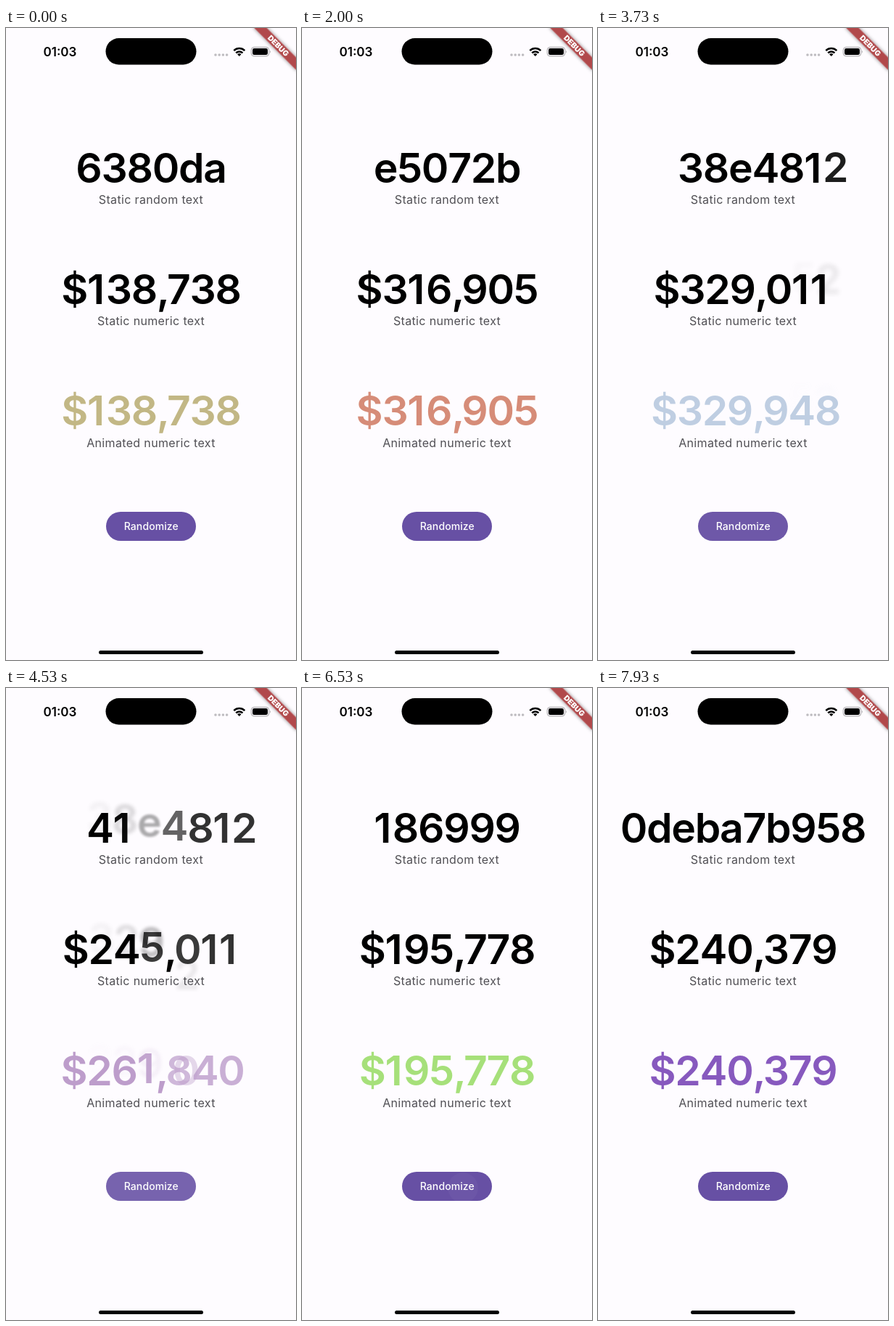
These frames come from a looping animation (400x870 px, 8 s). An HTML page:

```html
<!DOCTYPE html>
<html lang="en">
<head>
<meta charset="utf-8">
<title>Numeric text</title>
<style>
  html, body { margin: 0; width: 100%; height: 100%; overflow: hidden; background: #fefcff; }
  svg { display: block; width: 100%; height: 100%; font-family: Inter, Roboto, sans-serif; }
  .big { font-size: 57px; font-weight: 580; font-optical-sizing: none; }
  .label { font-size: 16px; letter-spacing: .35px; fill: #504f54; text-anchor: middle; }
</style>
</head>
<body>
<svg viewBox="0 0 400 870" xmlns="http://www.w3.org/2000/svg">
  <defs>
    <filter id="shade" x="-20%" y="-100%" width="140%" height="300%">
      <feDropShadow dx="0" dy="0" stdDeviation="2.5" flood-color="#000" flood-opacity=".5"/>
    </filter>
    <clipPath id="pill"><rect x="138" y="666" width="124" height="40" rx="20"/></clipPath>
  </defs>
  <rect width="400" height="870" fill="#fefcff"/>

  <text x="51.5" y="38.5" font-size="17" font-weight="600">01:03</text>
  <rect x="137.5" y="14" width="125" height="36.5" rx="18.2"/>
  <g fill="#bebcc0">
    <circle cx="289" cy="37" r="1.8"/><circle cx="294.2" cy="37" r="1.8"/>
    <circle cx="299.4" cy="37" r="1.8"/><circle cx="304.6" cy="37" r="1.8"/>
  </g>
  <g fill="none" stroke="#000" stroke-width="2.5">
    <path d="M314.3 31.2a10.6 10.6 0 0 1 15 0"/>
    <path d="M317.2 34.4a6.6 6.6 0 0 1 9.2 0"/>
  </g>
  <path d="M321.8 39l-2.7-2.8a4 4 0 0 1 5.4 0z"/>
  <rect x="338.3" y="26.4" width="24.4" height="12.4" rx="3.8" fill="none" stroke="#a09ea2"/>
  <rect x="340" y="28.1" width="21" height="9" rx="2.4"/>
  <path d="M364 30.6q1.5 2 0 4z" fill="#a09ea2"/>

  <g transform="translate(400 0) rotate(45)">
    <rect x="-42" y="28.5" width="84" height="12.2" fill="#b1494c" filter="url(#shade)"/>
    <text y="38.3" font-size="10.4" font-weight="900" fill="#fff" text-anchor="middle">DEBUG</text>
  </g>

  <g class="big" id="rows"></g>
  <text class="label" x="200" y="242">Static random text</text>
  <text class="label" x="200" y="409">Static numeric text</text>
  <text class="label" x="200" y="576.5">Animated numeric text</text>

  <g clip-path="url(#pill)">
    <rect x="138" y="666" width="124" height="40" fill="#6750a4"/>
    <circle id="ripple" cx="222" cy="688" fill="#fff"/>
  </g>
  <text x="200.3" y="691" font-size="14" font-weight="500" letter-spacing=".1" fill="#fff" text-anchor="middle">Randomize</text>
  <rect x="128" y="857" width="144" height="5" rx="2.5"/>
</svg>
<script>
const LOOP = 8000, STEP = 200 / 3, SLIDE = 585;

// press: finger down, start: the texts begin to change
const states = [
  { press: -2000, start: -2000, word: '6380da', value: 138738, color: [194, 183, 133] },
  { press: 330, start: 410, word: '73', value: 84443, color: [69, 192, 143] },
  { press: 1270, start: 1340, word: 'e5072b', value: 316905, color: [214, 140, 120] },
  { press: 2200, start: 2300, word: '28', value: 432252, color: [156, 219, 232] },
  { press: 3270, start: 3340, word: '38e4812', value: 329011, color: [208, 200, 223] },
  { press: 4200, start: 4342.495, word: '41', value: 245201, color: [151, 67, 162] },
  { press: 5400, start: 5449.4348, word: '186999', value: 195778, color: [166, 224, 122] },
  { press: 6530, start: 6830, word: '0deba7b958', value: 240379, color: [135, 89, 190] }
];

const rows = document.getElementById('rows');
const ripple = document.getElementById('ripple');
const clamp = x => Math.min(1, Math.max(0, x));
const mix = (a, b, k) => a + (b - a) * k;
const backOut = x => 1 + 2.7 * (x - 1) ** 3 + 1.7 * (x - 1) ** 2;
const money = v => '$' + Math.round(v).toLocaleString('en-US');

// Tight tracking, tighter at commas, looser at the narrow one
const tracking = ch => ch === ',' ? -4 : ch === '1' ? 1.5 : -1.3;
const widths = {};
function advance(ch) {
  if (!(ch in widths)) {
    rows.innerHTML = `<text>${ch}</text>`;
    widths[ch] = rows.firstChild.getComputedTextLength() + tracking(ch);
  }
  return widths[ch];
}
const widthOf = text => [...text].reduce((sum, ch) => sum + advance(ch), 0);

function glyph(ch, x, y, alpha = 1, blur = 0) {
  if (alpha < .01) return '';
  const style = blur > .2 ? ` style="filter:blur(${blur.toFixed(2)}px)"` : '';
  return `<text x="${x.toFixed(2)}" y="${y.toFixed(2)}" opacity="${alpha.toFixed(3)}"${style}>${ch}</text>`;
}

function leaving(ch, x, y, t, strength) {
  const gone = 1 - (1 - clamp(t / 250)) ** 2;
  return glyph(ch, x, y - 18 * gone, strength * (1 - gone) ** 1.5, 4 * gone);
}

function entering(ch, x, y, t) {
  const q = clamp(t / 115);
  return glyph(ch, x, y + 40 * (1 - backOut(q)), q ** .7, 3 * clamp(1 - q * 3));
}

// Characters change from left to right: old ones rise and blur, new ones spring up
function staticRow(y, from, to, age, lag = 0) {
  const width = mix(widthOf(from), widthOf(to), clamp(age / SLIDE));
  const count = Math.max(from.length, to.length);
  const waiting = 1 - .2 * clamp(age / 100);
  let oldX = 200 - width / 2, newX = oldX, ghosts = '', fresh = '';
  for (let i = 0; i < count; i++) {
    const a = from[i], b = to[i], t = age - lag - 300 * i / count;
    if (t < 0) {
      if (a) ghosts += glyph(a, oldX, y, waiting);
    } else if (a === b) {
      fresh += glyph(b, newX, y);
    } else {
      if (a) ghosts += leaving(a, oldX, y, t, .8);
      if (b) fresh += entering(b, newX, y, t);
    }
    if (a) oldX += advance(a);
    if (b) newX += advance(b);
  }
  return `<g>${ghosts}${fresh}</g>`;
}

// The running value is always visible; its digits hop in the same left to right wave
function countingRow(y, from, to, now, age, fill) {
  const slot = mix(widthOf(from), widthOf(to), clamp(age / SLIDE));
  const waiting = 1 - .2 * clamp(age / 100);
  let oldX = 200 - (slot + widthOf(now)) / 4, newX = oldX, ghosts = '', fresh = '';
  for (let i = 0; i < now.length; i++) {
    const a = from[i], b = now[i], t = age - 300 * i / now.length;
    const q = clamp(t / 115);
    if (a === b) {
      fresh += glyph(b, newX, y);
    } else {
      if (a && t >= 0) ghosts += leaving(a, oldX, y, t, .4);
      const alpha = t < 0 ? waiting : mix(.7, 1, q);
      fresh += glyph(b, newX, y + Math.min(0, 40 * (1 - backOut(q))), alpha);
    }
    if (a) oldX += advance(a);
    newX += advance(b);
  }
  return `<g fill="${fill}">${ghosts}${fresh}</g>`;
}

function textsAt(t) {
  const n = states.findLastIndex(s => t >= s.start);
  const to = states[n], from = states[Math.max(0, n - 1)];
  const age = t - to.start;
  const value = mix(to.value, from.value, (1 - clamp(age / 560)) ** 3.88);
  const rgb = to.color.map((c, i) => Math.round(mix(from.color[i], c, clamp(age / SLIDE))));
  const a = money(from.value), b = money(to.value);
  return staticRow(213, from.word, to.word, age, 40) +
    staticRow(380, a, b, age) +
    countingRow(547, a, b, money(value), age, `rgb(${rgb})`);
}

function drawRipple(t) {
  const s = states.findLast(s => t >= s.press);
  const held = t - s.press;
  const fade = 1 - clamp((t - s.start - 150) / 400);
  ripple.setAttribute('r', 18 + 90 * clamp(held / 225));
  ripple.setAttribute('opacity', .12 * clamp(.2 + held / 150) * fade);
}

let shown = -1;
function draw() {
  const step = Math.floor((performance.now() % LOOP + 5) / STEP) % Math.round(LOOP / STEP);
  if (step !== shown) {
    shown = step;
    const t = step * STEP;
    rows.innerHTML = textsAt(t);
    drawRipple(t + 4);
  }
  requestAnimationFrame(draw);
}
draw();
</script>
</body>
</html>
```
